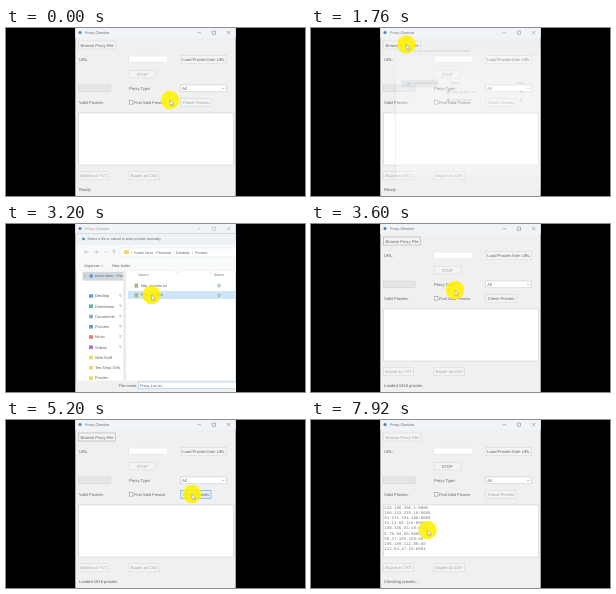
An HTML page that plays this animation: 299 by 168 pixels, repeating every 8000 ms.

```html
<!DOCTYPE html>
<html lang="en">
<head>
<meta charset="utf-8">
<title>Proxy Checker</title>
<style>
html, body { margin: 0; width: 100%; height: 100%; overflow: hidden; background: #000; }
svg { display: block; width: 100%; height: 100%; }
text { font-family: "Liberation Sans", Arial, sans-serif; white-space: pre; }
.mono { font-family: "Liberation Mono", monospace; }
</style>
</head>
<body>
<svg id="stage" viewBox="0 0 299 168" text-rendering="geometricPrecision"></svg>
<script>
const LOOP = 8000, STEP = 80;
const INK = '#626262', DIM = '#a2a2a2', EDGE = '#d2d2d2';
const $ = id => document.getElementById(id);

const rect = (x, y, w, h, fill, extra = '') =>
  `<rect x="${x}" y="${y}" width="${w}" height="${h}" fill="${fill}" ${extra}/>`;
const text = (x, y, s, size = 4.1, fill = INK, extra = '') =>
  `<text x="${x}" y="${y}" font-size="${size}" fill="${fill}" ${extra}>${s}</text>`;
const line = (d, color = '#777', w = 0.5) =>
  `<path d="${d}" fill="none" stroke="${color}" stroke-width="${w}"/>`;
const dot = (x, y, r, fill) => `<circle cx="${x}" cy="${y}" r="${r}" fill="${fill}"/>`;
const button = (id, x, y, w, h, label) =>
  `<g id="${id}">${rect(x, y, w, h, '#f4f4f4', 'stroke-width=".5"')}` +
  text(x + w / 2, y + h / 2 + 1.5, label, 4.1, INK, 'text-anchor="middle"') + '</g>';

const proxies = [
  '210.188.250.1:8080', '160.153.219.18:8000', '91.231.194.186:8080',
  '43.13.66.116:8080', '198.155.63.18:8080', '5.78.94.65:8080',
  '50.27.165.239:80', '195.109.112.80:80', '112.54.47.33:8081'
];

const app = () =>
  rect(69, 0, 161, 168, '#f0f0f0') +
  rect(69, 0, 161, 10, '#f0f4f8') +
  dot(74, 4.6, 1.5, '#4a7fb5') +
  `<g id="caption">${text(79, 6, 'Proxy Checker', 3.7)}` +
  line('M191.5 4.7h3.4M206.3 3.1h3.2v3.2h-3.2zM221 3l3.3 3.3m0-3.3l-3.3 3.3') + '</g>' +
  button('browse', 72.7, 13, 36.5, 8, 'Browse Proxy File') +
  text(73, 33, 'URL:') +
  rect(122.8, 28, 38.7, 6.2, '#fff', 'stroke="#dcdcdc" stroke-width=".4"') +
  button('load', 175, 27.6, 45.2, 8.2, 'Load Proxies from URL') +
  button('stop', 123, 42.2, 26.5, 7.8, 'STOP') +
  rect(72.5, 57, 31.8, 6.6, '#e5e5e5', 'stroke="#cdcdcd" stroke-width=".5"') +
  text(123, 62, 'Proxy Type:') +
  rect(174.8, 57, 45.4, 6.8, '#fff', 'stroke="#c0c0c0" stroke-width=".5"') +
  text(176.2, 61.9, 'All') +
  line('M216 59.8l1.3 1.3 1.3-1.3') +
  text(73, 75.8, 'Valid Proxies:') +
  rect(123.3, 72.4, 3.7, 3.7, '#fff', 'stroke="#808080" stroke-width=".5"') +
  text(128.2, 75.7, 'Find Valid Proxies', 3.9) +
  button('check', 174.8, 70.5, 30.2, 8, 'Check Proxies') +
  rect(72.6, 85, 155, 52, '#fff', 'stroke="#c8c8c8" stroke-width=".5"') +
  proxies.map((p, i) =>
    text(73.3, 89 + i * 5.1, p, 4.05, '#777', 'class="mono row"')).join('') +
  button('txt', 72.7, 143.8, 29.5, 8, 'Export as TXT') +
  button('csv', 123, 143.8, 30.2, 8, 'Export as CSV') +
  text(73, 163, 'Ready', 4.1, INK, 'id="status"');

const places = [
  ['Desktop', '#58a6da'], ['Downloads', '#5cb3a0'], ['Documents', '#8fa9bd'],
  ['Pictures', '#5f9fd6'], ['Music', '#dc8670'], ['Videos', '#9c7ac8'],
  ['Web Stuff', '#f3d570'], ['Tea Shop Gifts', '#f3d570'], ['Proxies', '#f3d570']
];

const file = (y, name) =>
  rect(128.5, y - 3.2, 3.6, 4, '#a3bd78') +
  text(134.8, y, name, 3.85) +
  `<circle cx="213" cy="${y - 1.2}" r="1.5" fill="#cfe3d2" stroke="#7fb18a" stroke-width=".6"/>`;

const toolbars = () =>
  line('M82.5 28h-4m1.5-1.5l-1.5 1.5 1.5 1.5M88 28h4m-1.5-1.5l1.5 1.5-1.5 1.5' +
    'M98.5 27.4l1.2 1.2 1.2-1.2M108 30v-4m-1.5 1.5l1.5-1.5 1.5 1.5', '#999') +
  rect(114, 24, 136, 8.4, '#fff', 'stroke="#e2e5e8" stroke-width=".4"') +
  rect(118, 26.3, 4.8, 3.7, '#f3d570') +
  text(125, 29.5, '›  Karim Noor - Personal  ›  Desktop  ›  Proxies', 3.7) +
  text(78, 43.3, 'Organize', 3.8) + line('M94.8 41.3l1.1 1.1 1.1-1.1') +
  text(106, 43.3, 'New folder', 3.8) +
  line('M70 46.6h180', '#e0e3e6', 0.4);

const sidebar = () =>
  places.map(([name, color], i) => {
    const y = 72 + i * 10.25;
    return rect(83, y - 1.8, 4, 3.6, color) + text(89, y + 1.3, name, 3.9) +
      (i < 6 ? line(`M113.4 ${y - 1.4}l1 2.2 1-2.2z`, '#999', 0.4) : '');
  }).join('') +
  rect(117.2, 47, 3, 109, '#ececec');

const dialog = () =>
  rect(70, 10, 180, 162, '#fff', 'stroke="#a9afb5" stroke-width=".7"') +
  rect(70, 10, 180, 11, '#edf2f7') +
  dot(77.5, 15, 1.3, '#4a7fb5') +
  rect(70, 21, 180, 25.5, '#f7f9fb') +
  text(81.5, 16.4, 'Select a file or cancel to enter proxies manually', 3.5) +
  rect(76.5, 47.8, 41, 8.8, '#d0d7dd') +
  line('M78.2 50.7l1.3 1.3-1.3 1.3') + dot(85.2, 52, 1.9, '#5b9fd8') +
  text(89, 53.3, 'Karim Noor - Pers', 3.7) +
  text(132.6, 52.3, 'Name', 3.7, '#777') + text(207.8, 52.3, 'Status', 3.7, '#777') +
  rect(122, 67, 128, 8, '#cfe5f7', 'id="picked"') +
  file(62.8, 'http_proxies.txt') + file(72.4, 'Proxy List.txt') +
  rect(70, 156.6, 180, 16, '#f0f0f0') +
  `<g id="loaded">${toolbars()}${sidebar()}` +
  line('M169.5 48.8l1-1 1 1', '#999', 0.4) + line('M204.5 47.5v7', '#e2e2e2', 0.4) +
  text(113, 162.8, 'File name:', 3.9) +
  rect(132.3, 158, 110, 6.8, '#fff', 'stroke="#8fb9d6" stroke-width=".5"') + '</g>' +
  text(134, 162.8, 'Proxy List.txt', 3.8, INK, 'id="chosen"');

$('stage').innerHTML =
  '<defs><clipPath id="win"><rect x="69.3" width="160.4" height="168"/></clipPath></defs>' +
  rect(0, 0, 299, 168, '#000') +
  `<g clip-path="url(#win)">${app()}<g id="dialog">${dialog()}</g></g>` +
  '<circle id="halo" r="9.2" fill="#fff000" opacity=".88"/>' +
  '<path id="arrow" d="M0 0v5.4l1.3-1.1.9 2 .9-.4-.9-1.9h1.7z" fill="#fff" stroke="#777" stroke-width=".4"/>';

// time, x, y
const path = [
  [80, 164, 72], [400, 115, 15], [480, 115, 15], [640, 82, 17], [800, 95, 17],
  [960, 96, 16.5], [1120, 104, 13], [1200, 96, 16], [1440, 95.4, 16.4], [1920, 95.4, 16.4],
  [2400, 150, 84], [2560, 160.2, 91], [2640, 160.2, 91], [2960, 146, 72], [3440, 145, 70],
  [3600, 144, 66], [3680, 144, 66], [4000, 117, 148], [4400, 106, 148], [4800, 125, 138],
  [5200, 186, 74], [5600, 185, 76], [6640, 185, 76], [6720, 178, 81], [6800, 139, 111],
  [6880, 139, 111], [7200, 124, 118], [7600, 120, 114], [7920, 116.6, 110]
];

const clamp = v => Math.max(0, Math.min(1, v));
const show = (el, on) => el.setAttribute('visibility', on ? 'visible' : 'hidden');

function pointer(t) {
  const i = path.findIndex(k => k[0] >= t);
  if (i < 1) return (i ? path[path.length - 1] : path[0]).slice(1);
  const [a, b] = [path[i - 1], path[i]];
  const p = (t - a[0]) / (b[0] - a[0]), e = p * p * (3 - 2 * p);
  return [a[1] + (b[1] - a[1]) * e, a[2] + (b[2] - a[2]) * e];
}

function setButton(id, enabled, hot, border = EDGE) {
  const [box, label] = $(id).children;
  label.setAttribute('fill', enabled ? INK : DIM);
  box.setAttribute('fill', hot ? '#dfeefa' : '#f4f4f4');
  box.setAttribute('stroke', hot ? '#3f93d2' : border);
}

function heldTime(t) {
  const n = Math.floor(t / STEP);
  return (n % 5 === 1 ? n - 1 : n) * STEP;
}

function draw(time) {
  const t = heldTime(time);
  const loaded = t >= 3520, checking = t >= 5760;

  const open = t < 3000 ? clamp((t - 1700) / 200) : clamp((3520 - t) / 230);
  const s = 0.83 + 0.17 * open;
  $('dialog').setAttribute('opacity', open);
  $('dialog').setAttribute('transform', `translate(190 80) scale(${s}) translate(-190 -80)`);
  $('caption').setAttribute('opacity', 1 - 0.4 * open);
  const picked = t >= 2960 && open > 0;
  show($('picked'), picked);
  show($('chosen'), picked);
  show($('loaded'), t >= 1840 && open > 0);

  setButton('browse', !checking, t >= 640 && t < 1760, loaded && !checking ? '#9a9a9a' : EDGE);
  setButton('load', true);
  setButton('stop', checking);
  setButton('check', loaded && !checking, t >= 5120 && t < 5760);
  setButton('txt', false);
  setButton('csv', false);
  $('status').textContent = checking ? 'Checking proxies...' : loaded ? 'Loaded 1818 proxies' : 'Ready';

  const found = t < 6960 ? 0 : Math.floor((t - 6960) / STEP * 1.2) + 2;
  document.querySelectorAll('.row').forEach((row, i) => show(row, i < found));

  const at = `translate(${pointer(t).join(' ')})`;
  $('halo').setAttribute('transform', at);
  $('arrow').setAttribute('transform', at);
}

function tick() {
  draw(performance.now() % LOOP);
  requestAnimationFrame(tick);
}
tick();
</script>
</body>
</html>
```
